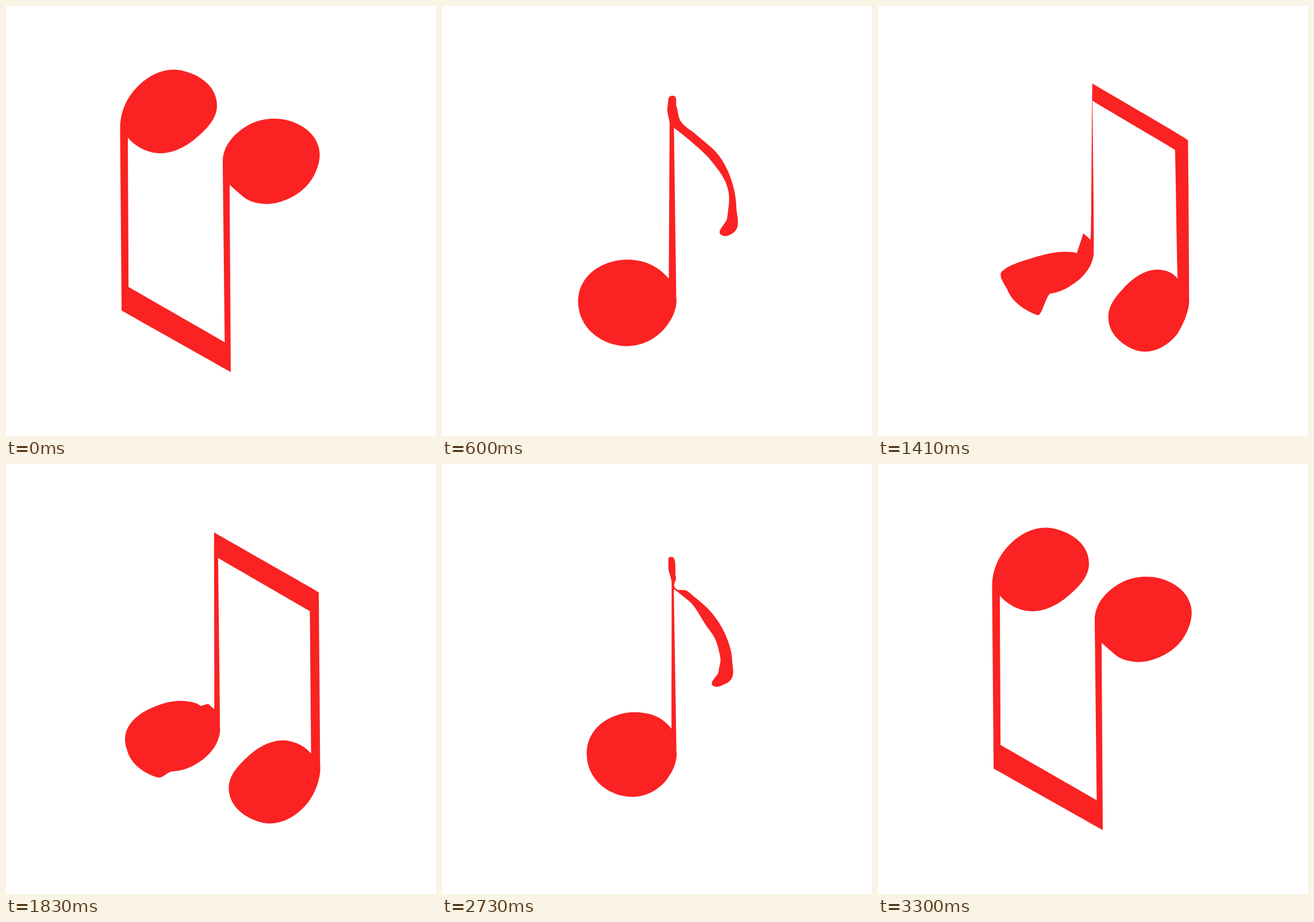
Write an HTML page with a canvas that moves like this. It is 748 by 748 pixels and loops after 3.6 s.

```html
<!DOCTYPE html>
<html lang="en">
<head>
<meta charset="utf-8">
<title>Morphing notes</title>
<style>
  html, body { margin: 0; width: 100%; height: 100%; overflow: hidden; background: #fff; }
  canvas { display: block; }
</style>
</head>
<body>
<canvas id="stage" width="748" height="748"></canvas>
<script>
const SIZE = 748, STEP = 30, MORPH = 600, SECTION = 900;
const ctx = document.getElementById('stage').getContext('2d');

const sub = (a, b) => [a[0] - b[0], a[1] - b[1]];
const add = (a, b, k = 1) => [a[0] + b[0] * k, a[1] + b[1] * k];
const scale = (a, k) => [a[0] * k, a[1] * k];
const dot = (a, b) => a[0] * b[0] + a[1] * b[1];
const unit = a => scale(a, 1 / Math.hypot(...a));

// Key points of the two notes, matched in order. The letter tells how a point
// is reached: L line to a corner, T line to a smooth point,
// C curve to a corner, S curve to a smooth point.
const beamedKeys = `
  L391.5,637 L201.5,530 T198.5,213
  S221,149 S307,112.5 S367,174 S335,226 S250,253.5 C212,229
  L213.5,489 L381,585 T377,272
  S422,207 S464,196 S491,199 S544.5,248 S534,298 S492,335 S442,343.5 S413,332
  L399,320 L389,311`;
const singleKeys = `
  S468,269 S498,321 S496,369
  S490.5,400 S506,395 S512,350 S507,315 S483,262 S440,222
  S415,200 S408,175 S401,156
  S392.5,174 S396,206 L395,475 S342,443 S237,519 S311,591 S388,560 S408,510
  L403.5,212 S433,235.5`;

const parse = text => text.trim().split(/\s+/).map(word =>
  ({ kind: word[0], at: word.slice(1).split(',').map(Number) }));

const isLine = key => 'LT'.includes(key.kind);

// Smooth points follow a neighbouring line, or else the circle through
// the point and its two neighbours.
function tangent(prev, key, next) {
  if ('LC'.includes(key.kind)) return null;
  const before = sub(key.at, prev.at), after = sub(next.at, key.at);
  if (isLine(key)) return unit(before);
  if (isLine(next)) return unit(after);
  return unit(add(scale(before, 1 / dot(before, before)), after, 1 / dot(after, after)));
}

// Handles as for a circular arc; a corner mirrors the tangent at the other end.
function handles(from, to, tanFrom, tanTo) {
  const chord = sub(to, from), along = unit(chord);
  const mirror = t => sub(scale(along, 2 * dot(t, along)), t);
  const reach = t => 2 * Math.hypot(...chord) / (3 * (1 + Math.max(0, dot(t, along))));
  const start = tanFrom || mirror(tanTo), end = tanTo || mirror(tanFrom);
  return [add(from, start, reach(start)), add(to, end, -reach(end))];
}

function outline(text) {
  const keys = parse(text);
  const near = i => keys[(i + keys.length) % keys.length];
  const tangents = keys.map((key, i) => tangent(near(i - 1), key, near(i + 1)));
  return keys.flatMap((key, i) => {
    const from = near(i - 1).at;
    const pair = isLine(key) ? [from, key.at]
      : handles(from, key.at, tangents.at(i - 1), tangents[i]);
    return [...pair, key.at].flat();
  });
}

const beamed = outline(beamedKeys);
const single = outline(singleKeys);
const upright = beamed.map(v => SIZE - v); // half turn about the centre
const poses = [beamed, single, upright, single];

function fillOutline(curve) {
  ctx.beginPath();
  ctx.moveTo(...curve.slice(-2));
  for (let i = 0; i < curve.length; i += 6) {
    ctx.bezierCurveTo(...curve.slice(i, i + 6));
  }
  ctx.closePath();
  ctx.fill();
}

function draw(now) {
  const time = Math.floor(now / STEP) * STEP % (SECTION * poses.length);
  const section = Math.floor(time / SECTION);
  const mix = Math.min(1, time % SECTION / MORPH);
  const from = poses[section], to = poses[(section + 1) % poses.length];

  ctx.fillStyle = '#fff';
  ctx.fillRect(0, 0, SIZE, SIZE);
  ctx.fillStyle = '#fa2222';
  fillOutline(from.map((v, i) => v + (to[i] - v) * mix));
}

function tick(now) {
  draw(now);
  requestAnimationFrame(tick);
}
draw(0);
requestAnimationFrame(tick);
</script>
</body>
</html>
```
